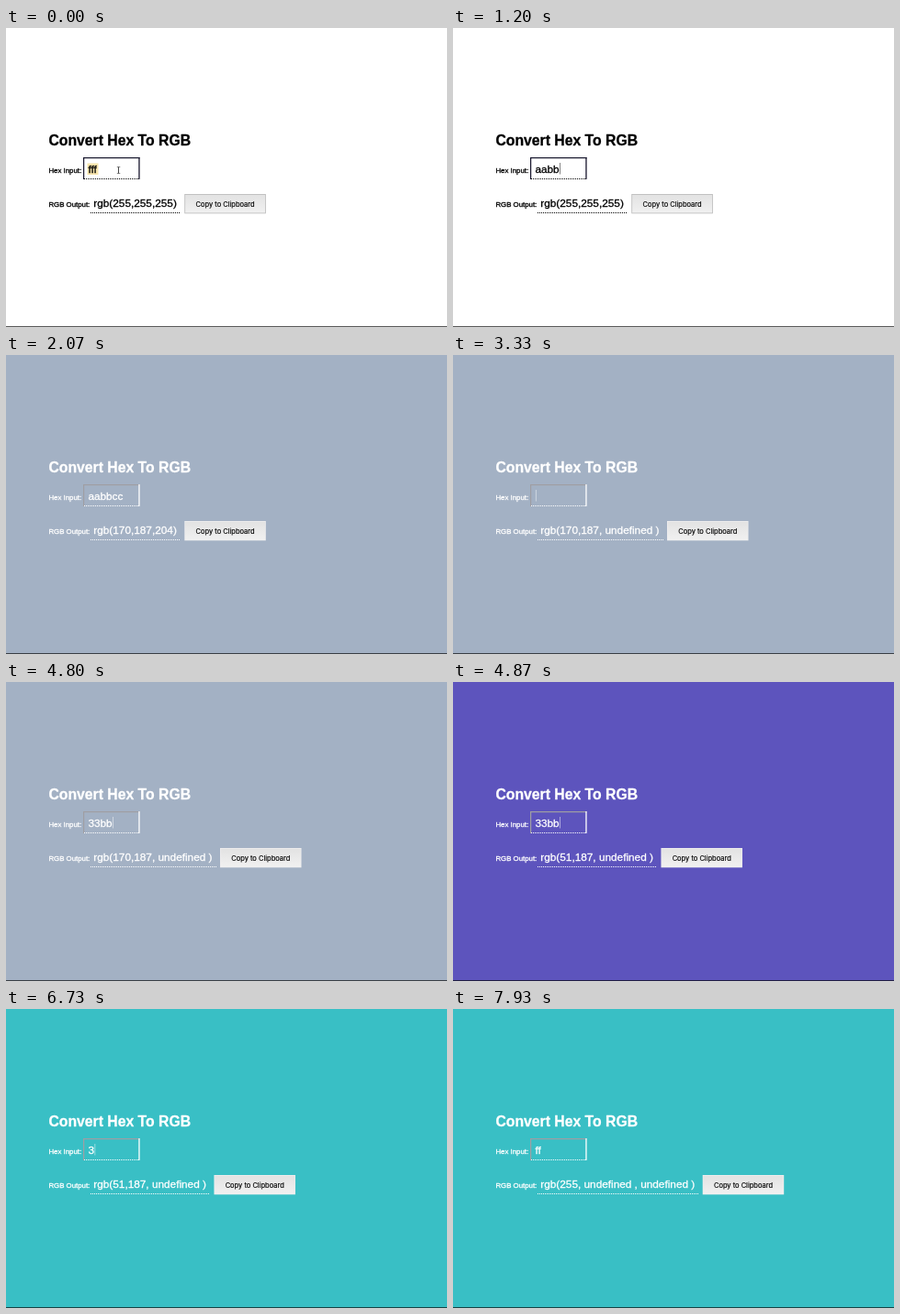
An HTML page with a canvas that plays this animation: 480x326 px, repeating every 8 s.

```html
<!DOCTYPE html>
<html lang="en">
<head>
<meta charset="utf-8">
<title>Convert Hex To RGB</title>
<style>
  html, body { margin: 0; width: 100%; height: 100%; overflow: hidden; background: #fff; }
  canvas { display: block; width: 480px; height: 326px; }
</style>
</head>
<body>
<canvas id="stage"></canvas>
<script>
const W = 480, H = 326, LOOP = 8000, BLINK = 500;
const SANS = '"Liberation Sans", Arial, sans-serif';
const BUTTON_W = 88.5;

const canvas = document.getElementById('stage');
const ctx = canvas.getContext('2d');
const ratio = window.devicePixelRatio || 1;
canvas.width = W * ratio;
canvas.height = H * ratio;
ctx.scale(ratio, ratio);
ctx.lineJoin = 'round';

// What stands in the input field, by time of the key press
const keys = [
  [0, 'fff'], [600, ''], [670, 'a'], [730, 'aa'], [1070, 'aab'], [1200, 'aabb'],
  [1470, 'aabbc'], [1570, 'aabbcc'],
  [2730, 'aabbc'], [2930, 'aabb'], [3000, 'aab'], [3070, 'aa'], [3200, 'a'], [3330, ''],
  [4000, '3'], [4200, '33'], [4530, '33b'], [4670, '33bb'],
  [5330, '33bbc'], [5470, '33bbcc'],
  [6200, '33bbc'], [6270, '33bb'], [6470, '33b'], [6600, '33'], [6730, '3'], [6870, ''],
  [7270, 'f'], [7430, 'ff']
];

// Hex value last converted, and the page colour it leaves behind
const results = [
  [0, 'ffffff', '#ffffff'],
  [1330, 'aabb', '#b6b5c7'],
  [2000, 'aabbcc', '#a3b1c4'],
  [2870, 'aabbc', '#a3b1c4'],
  [4870, '33bb', '#5d54bd'],
  [5530, '33bbcc', '#39bfc5'],
  [6330, '33bbc', '#39bfc5'],
  [7670, 'ff', '#39bfc5']
];

const latest = (list, t) => list.filter(item => item[0] <= t).pop();

function toRgb(hex) {
  const pairs = hex.match(/../g);
  const parts = [0, 1, 2].map(i => pairs[i] ? parseInt(pairs[i], 16) : ' undefined ');
  return `rgb(${parts.join(',')})`;
}

function rect(x, y, w, h, color) {
  ctx.fillStyle = color;
  ctx.fillRect(x, y, w, h);
}

// A hairline around the glyphs gives the heavier screen weight
function text(str, x, y, font, color, weight = 0.3) {
  ctx.font = font;
  ctx.fillStyle = ctx.strokeStyle = color;
  ctx.lineWidth = weight;
  ctx.fillText(str, x, y);
  ctx.strokeText(str, x, y);
  return ctx.measureText(str).width;
}

function dots(x1, x2, y, color) {
  for (let x = x1; x < x2; x += 2) rect(x, y, 1, 1, color);
}

function drawInput(t, ink, light) {
  const [pressed, value] = latest(keys, t);
  const edge = light ? '#16152c' : '#9f9ea3';
  rect(84, 141, 61.5, 1.2, edge);
  rect(84, 141, 1.2, 24, edge);
  rect(144.3, 141, 1.3, 24, light ? edge : '#fff');
  dots(85, 144, 164, ink);

  const selected = value === 'fff';
  if (selected) rect(88.5, 147.5, 12, 12.5, '#f8e5ac');
  const width = text(value, 89.4, 158, `11.78px ${SANS}`, ink);
  if (selected) {
    drawPointer(122.5, 155);
  } else if ((t - pressed) % (2 * BLINK) < BLINK) {
    ctx.globalAlpha = 0.6;
    rect(89.9 + width, 147, 0.8, 12.5, ink);
    ctx.globalAlpha = 1;
  }
}

function drawPointer(x, y) {
  rect(x - 0.4, y - 3.5, 0.9, 7, '#333');
  rect(x - 1.7, y - 3.9, 3.5, 0.7, '#555');
  rect(x - 1.7, y + 3.2, 3.5, 0.7, '#555');
}

function drawButton(x, light) {
  const fill = ctx.createLinearGradient(0, 181, 0, 202);
  fill.addColorStop(0, '#e2e2e2');
  fill.addColorStop(1, '#f1f1f1');
  rect(x, 181, BUTTON_W, 21.3, light ? '#b9b9b9' : '#eeeeef');
  rect(x + 0.8, 181.8, BUTTON_W - 1.6, 19.7, fill);
  ctx.textAlign = 'center';
  text('Copy to Clipboard', x + BUTTON_W / 2, 194.5, '7.5px Inter, sans-serif', '#000', 0.15);
  ctx.textAlign = 'left';
}

function draw(t) {
  const [, hex, page] = latest(results, t);
  const light = page === '#ffffff';
  const ink = light ? '#000' : '#fff';

  rect(0, 0, W, H, page);
  rect(0, H - 1, W, 1, 'rgba(0, 0, 0, 0.65)');
  text('Convert Hex To RGB', 46.4, 127.5, `bold 15.75px ${SANS}`, ink);
  text('Hex Input:', 46.4, 157.8, `7.85px ${SANS}`, ink);
  text('RGB Output:', 46.4, 194.7, `7.85px ${SANS}`, ink);
  drawInput(t, ink, light);

  const end = 99.3 + text(toRgb(hex), 95.3, 194.8, `11.8px ${SANS}`, ink);
  dots(92, end, 201, ink);
  drawButton(end + 4.5, light);
}

const start = performance.now();
function tick() {
  draw((performance.now() - start) % LOOP);
  requestAnimationFrame(tick);
}
tick();
</script>
</body>
</html>
```
